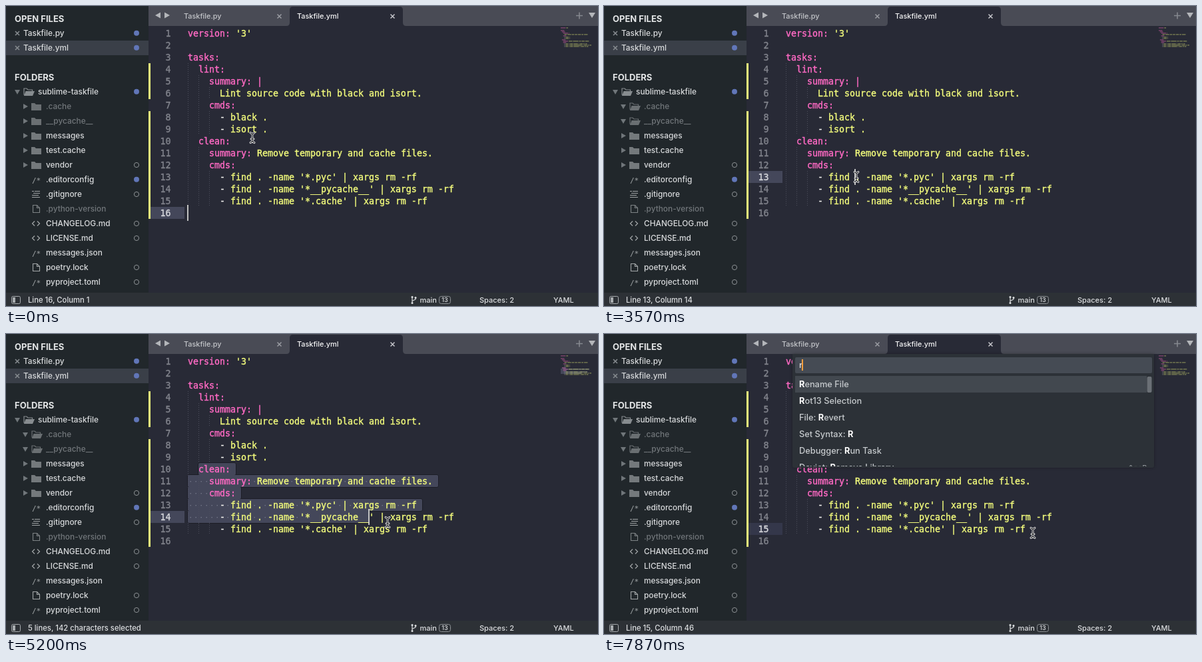
An HTML page with a canvas for the animation above (8 s loop, 889 by 451 pixels).

```html
<!DOCTYPE html>
<html lang="en">
<head>
<meta charset="utf-8">
<title>Editor session</title>
<style>
html, body { margin: 0; width: 100%; height: 100%; overflow: hidden; background: #282a36; }
canvas { display: block; width: 889px; height: 451px; }
</style>
</head>
<body>
<canvas id="stage"></canvas>
<script>
const W = 889, H = 451, LOOP = 8000, STEP = 148.4;
const canvas = document.getElementById('stage');
const ratio = window.devicePixelRatio || 1;
canvas.width = W * ratio;
canvas.height = H * ratio;
const ctx = canvas.getContext('2d');
ctx.scale(ratio, ratio);

const UI = 'Inter, "Open Sans", sans-serif';
const MONO = '13.29px "DejaVu Sans Mono", "Liberation Mono", monospace';
const YELLOW = '#f1fa7c', PINK = '#ff6ac4', WHITE = '#f4f4f0', BLUE = '#6176b8';
const CHAR = 8, ROW = 18, LEFT = 273, TOP = 32;

const code = [
  "version: '3'",
  '',
  'tasks:',
  '  lint:',
  '    summary: |',
  '      Lint source code with black and isort.',
  '    cmds:',
  '      - black .',
  '      - isort .',
  '  clean:',
  '    summary: Remove temporary and cache files.',
  '    cmds:',
  "      - find . -name '*.pyc' | xargs rm -rf",
  "      - find . -name '*__pycache__' | xargs rm -rf",
  "      - find . -name '*.cache' | xargs rm -rf",
  ''
];

// name, icon, mark, ignored
const tree = [
  ['.cache', 'dir', '', true],
  ['__pycache__', 'dir', '', true],
  ['messages', 'dir', ''],
  ['test.cache', 'dir', ''],
  ['vendor', 'dir', 'o'],
  ['.editorconfig', 'code', '*'],
  ['.gitignore', 'list', 'o'],
  ['.python-version', 'page', '', true],
  ['CHANGELOG.md', 'tag', 'o'],
  ['LICENSE.md', 'tag', 'o'],
  ['messages.json', 'code', ''],
  ['poetry.lock', 'page', 'o'],
  ['pyproject.toml', 'code', 'o']
];

const commands = [
  ['', 'R', 'ename File'],
  ['', 'R', 'ot13 Selection'],
  ['File: ', 'R', 'evert'],
  ['Set Syntax: ', 'R', ''],
  ['Debugger: ', 'R', 'un Task'],
  ['Deviot: ', 'R', 'emove Library']
];

// step, x, y of the pointer
const pointerPath = [
  [0, 370, 198], [6, 94, 181], [9, 88, 178], [16, 85, 159], [19, 85, 159],
  [24, 379, 257], [25, 379, 257], [31, 290, 205], [32, 290, 205],
  [33, 345, 214], [34, 455, 250], [35, 573, 283], [37, 634, 298], [40, 644, 299]
];

// step, line, column, selecting
const caretPath = [
  [0, 16, 0, false], [24, 13, 13, false], [32, 10, 2, false],
  [33, 10, 8, true], [34, 12, 9, true], [35, 14, 34, true], [36, 15, 42, true],
  [37, 15, 45, true], [40, 15, 45, true], [44, 15, 45, false]
];
const ANCHOR = { line: 10, col: 2 };
const BLUR_STEP = 44, PALETTE_STEP = 49, TYPE_STEP = 53;

function rect(x, y, w, h, color) {
  ctx.fillStyle = color;
  ctx.fillRect(x, y, w, h);
}

function round(x, y, w, h, r, color) {
  ctx.fillStyle = color;
  ctx.beginPath();
  ctx.roundRect(x, y, w, h, r);
  ctx.fill();
}

function poly(points, color) {
  ctx.fillStyle = color;
  ctx.beginPath();
  points.forEach(([x, y]) => ctx.lineTo(x, y));
  ctx.closePath();
  ctx.fill();
}

function stroke(paths, color, width = 1) {
  ctx.strokeStyle = color;
  ctx.lineWidth = width;
  ctx.beginPath();
  for (const path of paths) {
    path.forEach(([x, y], i) => i ? ctx.lineTo(x, y) : ctx.moveTo(x, y));
  }
  ctx.stroke();
}

function circle(x, y, r, color, hollow) {
  ctx.beginPath();
  ctx.arc(x, y, r, 0, Math.PI * 2);
  ctx.lineWidth = 1;
  ctx.fillStyle = ctx.strokeStyle = color;
  hollow ? ctx.stroke() : ctx.fill();
}

// Returns the x where the text ends
function text(s, x, y, font, color, align = 'left') {
  ctx.font = font;
  ctx.fillStyle = color;
  ctx.textAlign = align;
  ctx.fillText(s, x, y);
  return x + ctx.measureText(s).width;
}

// Code is set slightly heavier than the regular weight
function codeText(s, x, y, color, align) {
  text(s, x, y, MONO, color, align);
  ctx.strokeStyle = color;
  ctx.lineWidth = 0.4;
  ctx.strokeText(s, x, y);
}

const ui = (size, weight = 500) => `${weight} ${size}px ${UI}`;
const lineTop = line => TOP + (line - 1) * ROW;

function cross(x, y, r, color, width) {
  stroke([[[x - r, y - r], [x + r, y + r]], [[x + r, y - r], [x - r, y + r]]], color, width);
}

function pointerAt(n) {
  const i = pointerPath.findIndex(p => p[0] > n);
  if (i < 0) return pointerPath[pointerPath.length - 1].slice(1);
  const [n0, x0, y0] = pointerPath[i - 1], [n1, x1, y1] = pointerPath[i];
  const u = (n - n0) / (n1 - n0), k = u * u * (3 - 2 * u);
  return [x0 + (x1 - x0) * k, y0 + (y1 - y0) * k];
}

function caretAt(n) {
  const [step, line, col, selecting] = caretPath.filter(c => c[0] <= n).pop();
  return { step, line, col, selecting };
}

// Smooth blink, fully lit just after an action
function blink(age) {
  return Math.max(0, Math.min(1, 0.5 + 0.8 * Math.cos((age - 120) / 1100 * Math.PI * 2)));
}

// Column span of the selection on each touched line
function selectionSpans(caret) {
  const spans = [];
  if (!caret.selecting) return spans;
  for (let line = ANCHOR.line; line <= caret.line; line++) {
    const last = line === caret.line;
    spans.push({
      line,
      from: line === ANCHOR.line ? ANCHOR.col : 0,
      to: last ? caret.col : code[line - 1].length + 1
    });
  }
  return spans;
}

function tokens(s) {
  const [, indent, key, gap, rest] = s.match(/^(\s*)([a-z]+:)?(\s?)(.*)$/);
  const start = indent.length;
  const list = [];
  if (key) list.push([start, key, PINK]);
  let col = start + (key || '').length + gap.length;
  if (rest.startsWith('- ')) {
    list.push([col, '-', WHITE]);
    list.push([col + 2, rest.slice(2), YELLOW]);
  } else if (rest) {
    list.push([col, rest, rest === '|' ? PINK : YELLOW]);
  }
  return list;
}

function disclosure(x, y, turn, color) {
  ctx.save();
  ctx.translate(x, y);
  ctx.rotate(turn * Math.PI / 2);
  poly([[-3, -4], [4, 0], [-3, 4]], color);
  ctx.restore();
}

function folder(x, y, open, color) {
  if (!open) {
    poly([[x, y - 5], [x + 5, y - 5], [x + 7, y - 3], [x + 15, y - 3], [x + 15, y + 6], [x, y + 6]], color);
    return;
  }
  stroke([[[x + 2, y + 5], [x + 1, y + 4], [x + 1, y - 5], [x + 5, y - 5], [x + 7, y - 3],
    [x + 13.5, y - 3], [x + 13.5, y - 1]]], color, 1.2);
  poly([[x + 3.5, y - 1], [x + 17, y - 1], [x + 14, y + 6], [x + 1, y + 6]], color);
}

function fileIcon(kind, y, color) {
  if (kind === 'code') {
    text('/*', 39, y + 4.5, '11px "DejaVu Sans Mono", monospace', color);
  } else if (kind === 'tag') {
    stroke([[[43, y - 3.5], [39.5, y], [43, y + 3.5]], [[47, y - 3.5], [50.5, y], [47, y + 3.5]]], color, 1.2);
  } else if (kind === 'list') {
    stroke([[[39, y - 4.5], [42, y - 4.5]], [[43, y - 4.5], [51, y - 4.5]], [[41, y - 1.5], [51, y - 1.5]],
      [[39, y + 1.5], [49, y + 1.5]], [[39, y + 4.5], [51, y + 4.5]]], color, 1.2);
  } else {
    stroke([[[40.5, y - 5.5], [46.5, y - 5.5], [50.5, y - 1.5], [50.5, y + 5.5], [40.5, y + 5.5], [40.5, y - 6]],
      [[46.5, y - 5.5], [46.5, y - 1.5], [50.5, y - 1.5]]], color, 1.1);
  }
}

function mark(kind, y) {
  if (kind === '*') circle(196, y - 0.3, 4, BLUE);
  if (kind === 'o') circle(196, y, 3.6, '#8d9295', true);
}

function drawSidebar(n, [mx, my]) {
  const label = ui(11.85);
  rect(0, 0, 214, 431, '#21272b');
  rect(0, 52, 214, 22, '#3a3f48');
  const hover = Math.floor((my - 140) / 22);
  if (mx < 214) rect(0, 140 + hover * 22, 214, 22, '#282b37');

  text('OPEN FILES', 13, 23.8, ui(13, 700), '#e4e6e7');
  text('FOLDERS', 13, 111.8, ui(13, 700), '#e4e6e7');
  ['Taskfile.py', 'Taskfile.yml'].forEach((name, i) => {
    const y = 41 + i * 22;
    cross(17, y, 3, '#868b8f', 1.6);
    text(name, 26, y + 4.3, label, '#d8dadc');
    mark('*', y);
  });

  disclosure(17, 129, 1, '#70767a');
  folder(26, 129, true, '#878c8f');
  text('sublime-taskfile', 48, 133.3, label, '#d8dadc');
  mark('*', 129);

  const openStep = { '.cache': 17, '__pycache__': 8 };
  tree.forEach(([name, icon, flag, ignored], i) => {
    const y = 151 + i * 22;
    if (icon === 'dir') {
      const start = openStep[name];
      const turn = start ? Math.max(0, Math.min(1, (n - start + 1) / 2)) : 0;
      disclosure(29, y, turn, '#70767a');
      folder(38, y, turn > 0, ignored ? '#6a6f72' : '#74797c');
    } else {
      fileIcon(icon, y, ignored ? '#7d8285' : '#a2a6a8');
    }
    text(name, 60, y + 4.3, label, ignored ? '#71767a' : '#d8dadc');
    mark(flag, y);
  });
}

function drawTabs() {
  rect(214, 0, 675, 30, '#494b55');
  ctx.fillStyle = '#282a36';
  ctx.beginPath();
  ctx.moveTo(421, 30);
  ctx.quadraticCurveTo(426, 30, 426, 25);
  ctx.lineTo(426, 6);
  ctx.quadraticCurveTo(426, 1, 431, 1);
  ctx.lineTo(591, 1);
  ctx.quadraticCurveTo(596, 1, 596, 6);
  ctx.lineTo(596, 25);
  ctx.quadraticCurveTo(596, 30, 601, 30);
  ctx.fill();
  poly([[224, 14], [232, 9.5], [232, 18.5]], '#b4b6ba');
  poly([[246, 14], [238, 9.5], [238, 18.5]], '#b4b6ba');
  text('Taskfile.py', 267, 19, ui(10.9), '#c3c5c9');
  text('Taskfile.yml', 437, 19, ui(10.9), '#f4f4f5');
  cross(410.5, 15.5, 3, '#9a9ca2', 1.5);
  cross(580.5, 15.5, 3, '#c4c5ca', 1.5);
  stroke([[[856, 14.5], [866, 14.5]], [[861, 9.5], [861, 19.5]]], '#85888f', 1.6);
  poly([[875, 10], [885, 10], [880, 18]], '#b4b6ba');
}

function drawSelection(spans) {
  const boxes = spans.map(s => [LEFT + s.from * CHAR, lineTop(s.line), (s.to - s.from) * CHAR, ROW]);
  ctx.strokeStyle = '#1c1d26';
  ctx.lineWidth = 2;
  for (const box of boxes) {
    ctx.beginPath();
    ctx.roundRect(...box, 3);
    ctx.stroke();
  }
  boxes.forEach(([x, y, w, h]) => round(x, y, w, h, 2, '#44475a'));
  for (const { line, from, to } of spans) {
    [...code[line - 1]].forEach((c, col) => {
      if (c === ' ' && col >= from && col < to) {
        rect(LEFT + col * CHAR + 3.5, lineTop(line) + 9, 1.4, 1.4, '#757889');
      }
    });
  }
}

function drawGuides() {
  ctx.save();
  ctx.setLineDash([1, 2]);
  code.forEach((s, i) => {
    const depth = s.search(/\S/);
    for (let col = 0; col < depth; col += 2) {
      const x = LEFT + col * CHAR + 0.5, y = lineTop(i + 1);
      stroke([[[x, y], [x, y + ROW]]], '#4c4e5c');
    }
  });
  ctx.restore();
}

function drawMinimap(spans) {
  const scale = 0.92, x0 = 833;
  for (const { line, from, to } of spans) {
    rect(x0 + from * scale, 30 + line * 2, (to - from) * scale, 2, '#44475a');
  }
  ctx.globalAlpha = 0.55;
  code.forEach((s, i) => {
    for (const [col, part, color] of tokens(s)) {
      for (const word of part.matchAll(/\S+/g)) {
        rect(x0 + (col + word.index) * scale, 32.4 + i * 2, word[0].length * scale, 1, color);
      }
    }
  });
  ctx.globalAlpha = 1;
}

function drawEditor(n, t, caret, spans) {
  rect(214, 30, 675, 401, '#282a36');
  rect(217, lineTop(caret.line), 51, ROW, n < BLUR_STEP ? '#44475a' : '#34374a');
  rect(214, lineTop(4), 3, 3 * ROW, YELLOW);
  rect(214, lineTop(8), 3, 9 * ROW, YELLOW);
  drawSelection(spans);
  drawGuides();
  code.forEach((s, i) => {
    const base = lineTop(i + 1) + 14;
    codeText(i + 1, 247.5, base, i + 1 === caret.line ? '#d6d7dc' : '#82848d', 'right');
    for (const [col, part, color] of tokens(s)) codeText(part, LEFT + col * CHAR, base, color);
  });
  drawMinimap(spans);
  if (n < PALETTE_STEP) {
    const age = caret.step ? t - caret.step * STEP : t + 250;
    ctx.globalAlpha = blink(age);
    rect(LEFT + caret.col * CHAR - 0.8, lineTop(caret.line) - 3, 1.6, 24, '#e8e8e4');
    ctx.globalAlpha = 1;
  }
}

function statusText(caret, spans) {
  if (!caret.selecting) return `Line ${caret.line}, Column ${caret.col + 1}`;
  const total = spans.reduce((sum, s) => sum + s.to - s.from, 0);
  const lines = spans.length > 1 ? `${spans.length} lines, ` : '';
  return `${lines}${total} characters selected`;
}

function drawStatus(message) {
  const gray = '#a9adb0', ink = '#dcdee0';
  rect(0, 431, W, 20, '#2d3136');
  ctx.strokeStyle = gray;
  ctx.lineWidth = 1;
  ctx.beginPath();
  ctx.roundRect(8.5, 436.5, 13, 11, 2);
  ctx.stroke();
  rect(10, 438, 4, 8, gray);
  text(message, 33, 446.2, ui(11.25), ink);

  stroke([[[610, 438], [610, 446]], [[615, 439], [615, 441], [610, 443.5]]], ink, 1.2);
  for (const [x, y] of [[610, 437.5], [610, 446.5], [615, 438.5]]) circle(x, y, 1.5, ink);
  text('main', 621.5, 446.2, ui(11), ink);
  ctx.strokeStyle = '#8e9296';
  ctx.lineWidth = 1;
  ctx.beginPath();
  ctx.roundRect(650.5, 436.5, 17, 11, 3);
  ctx.stroke();
  text('13', 659, 445.4, ui(9), ink, 'center');
  text('Spaces: 2', 711, 446.2, ui(11), ink);
  text('YAML', 822, 446.2, ui(10.9), ink);
}

function drawPalette(n, t) {
  const typed = n >= TYPE_STEP;
  ctx.save();
  ctx.shadowColor = 'rgba(0,0,0,.3)';
  ctx.shadowBlur = 4;
  round(283, 30, 543, 171, [0, 0, 3, 3], '#2c3137');
  ctx.restore();
  round(287, 35, 536, 24, 2, '#454b54');

  ctx.save();
  ctx.beginPath();
  ctx.rect(283, 60, 543, 139);
  ctx.clip();
  rect(287, 63, 528, 25, '#42484f');
  commands.forEach(([before, hit, after], i) => {
    const y = 80 + i * 25, color = '#c6cacd';
    let x = text(before, 293, y, ui(12.8), color);
    x = text(hit, x, y, ui(12.8, typed ? 700 : 500), typed ? '#ffffff' : color);
    text(after, x, y, ui(12.8), color);
  });
  text('⌃⌥R', 816, 205, '11px "DejaVu Sans", sans-serif', '#9a9fa3', 'right');
  round(815.5, 64, 7, 24, 2, '#6b7076');
  ctx.restore();

  const x = typed ? text('r', 293, 51, ui(12.8), '#e6e8ea') : 293;
  ctx.globalAlpha = blink(t - (typed ? TYPE_STEP : PALETTE_STEP) * STEP);
  rect(x - 1, 38, 2, 17, '#fba13d');
  ctx.globalAlpha = 1;
}

function drawPointer([x, y]) {
  if (x < 214) {
    const shape = [[0, 0], [0, 15], [3.6, 11.8], [6.2, 17.2], [8.6, 16], [6.1, 10.8], [10.6, 10.6]]
      .map(([dx, dy]) => [x + dx, y + dy]);
    ctx.lineJoin = 'round';
    stroke([[...shape, shape[0], shape[1]]], '#f2f2f2', 2);
    poly(shape, '#17181c');
    ctx.lineJoin = 'miter';
    return;
  }
  const beam = [
    [[x - 3, y - 7.5], [x, y - 5.5], [x + 3, y - 7.5]],
    [[x, y - 5.5], [x, y + 5.5]],
    [[x - 3, y + 7.5], [x, y + 5.5], [x + 3, y + 7.5]],
    [[x - 2, y + 2], [x + 2, y + 2]]
  ];
  ctx.lineCap = ctx.lineJoin = 'round';
  stroke(beam, '#f2f2f2', 2.8);
  stroke(beam, '#15161a', 1.1);
  ctx.lineCap = 'butt';
  ctx.lineJoin = 'miter';
}

function draw(now) {
  const t = now % LOOP;
  const n = Math.floor((t + 5) / STEP);
  const held = n * STEP;
  const pointer = pointerAt(n), caret = caretAt(n), spans = selectionSpans(caret);
  drawEditor(n, held, caret, spans);
  drawTabs();
  drawSidebar(n, pointer);
  if (n >= PALETTE_STEP) drawPalette(n, held);
  drawStatus(statusText(caret, spans));
  drawPointer(pointer);
}

const start = performance.now();
function tick() {
  draw(performance.now() - start);
  requestAnimationFrame(tick);
}
tick();
</script>
</body>
</html>
```
